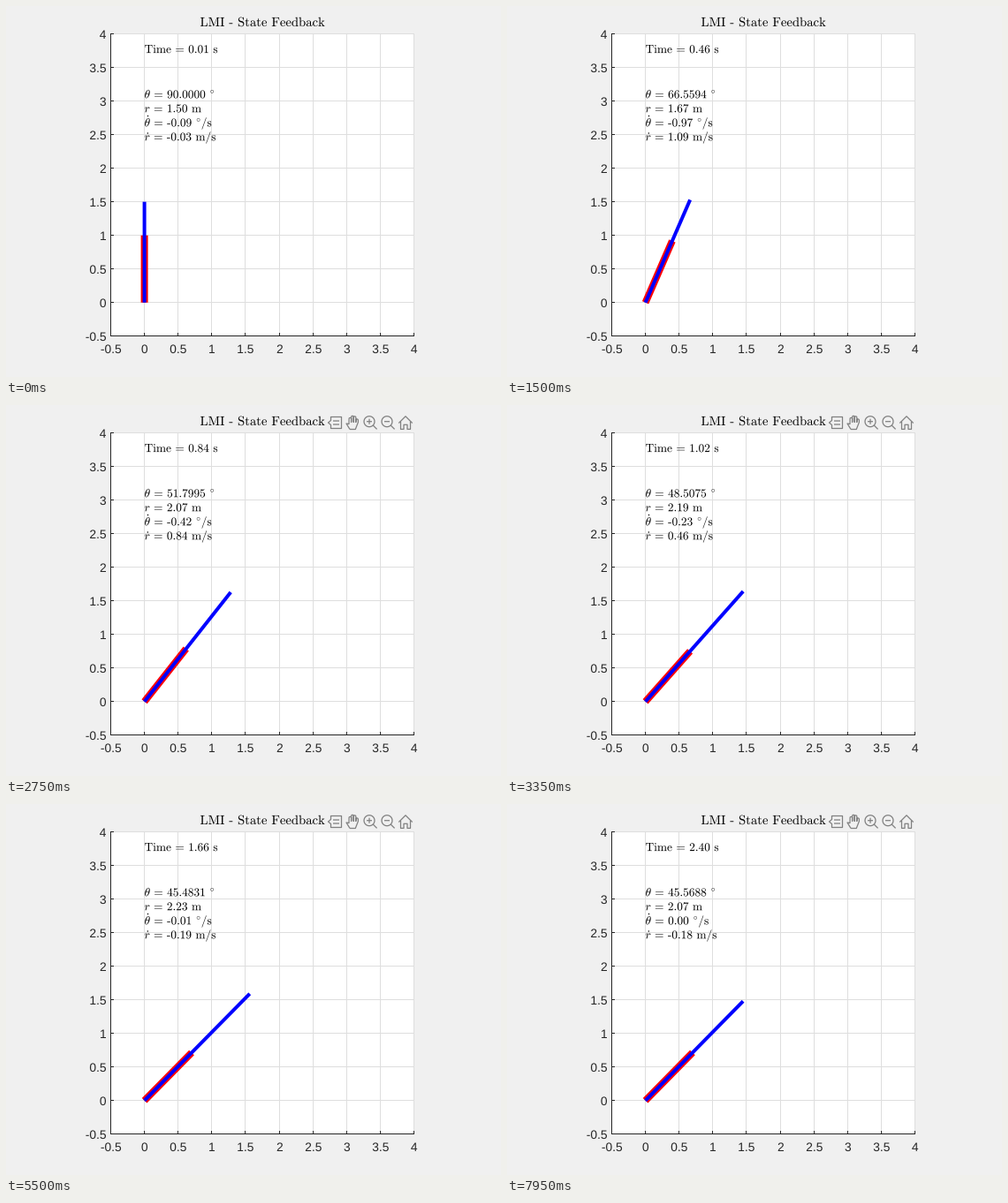
A matplotlib script for the animation above (8000 ms loop, 560x420 px).

```python
import numpy as np
import matplotlib.pyplot as plt
from matplotlib.animation import FuncAnimation
from matplotlib.patches import PathPatch
from matplotlib.textpath import TextPath
from matplotlib.transforms import Affine2D

plt.rcParams["mathtext.fontset"] = "cm"
plt.rcParams["font.family"] = "Liberation Sans"

W, H = 560, 420
N, DT = 160, 0.015
INK = (0.15, 0.15, 0.15)
GRID = (0.8725, 0.8725, 0.8725)
LEFT, TOP = 118.5, 31.5
DX, DY = 38.1, 38.03           # pixels per half unit
X0, Y0 = LEFT + DX, TOP + 8 * DY
GAP = r"\hspace{0.38}"         # one text space

# Angle: a damped swing towards its rest value
t = DT * np.arange(N)
DAMP, FREQ, LAG = 3.125, 1.75, 1.0445
REST = np.radians(45.62)
swing = np.exp(-DAMP * t) * np.cos(FREQ * t - LAG) / np.cos(LAG)
theta = REST + (np.pi / 2 - REST) * swing

# Reach: smooth curve through (time, length, speed)
KEYS = np.array([(0, 1.5, -0.03), (0.24, 1.5, 0.38), (0.66, 1.91, 1.1),
                 (1.005, 2.19, 0.46), (1.275, 2.26, 0.06),
                 (1.65, 2.23, -0.19), (2.39, 2.07, -0.18)])


def hermite(t):
    k = np.clip(np.searchsorted(KEYS[:, 0], t, "right") - 1, 0, len(KEYS) - 2)
    t0, p0, v0 = KEYS[k].T
    t1, p1, v1 = KEYS[k + 1].T
    h = t1 - t0
    u = (t - t0) / h
    ease = u * u * (3 - 2 * u)
    return (p0 + (p1 - p0) * ease + h * u * (1 - u) ** 2 * v0
            - h * u * u * (1 - u) * v1)


reach = hermite(t)
spin, slide = (np.gradient(x, DT, edge_order=2) for x in (theta, reach))

fig = plt.figure(figsize=(W / 100, H / 100), dpi=100, facecolor="#f0f0f0")
ax = fig.add_axes([0, 0, 1, 1])
ax.set_xlim(0, W)
ax.set_ylim(H, 0)
ax.axis("off")


def line(xs, ys, color, width=1.0, z=2, **kw):
    return ax.plot(xs, ys, color=color, lw=width * 0.72, zorder=z, snap=False,
                   solid_capstyle="butt", **kw)[0]


def label(x, y, s, size, color="black", align=0.0):
    """Text as outlines; align 0, 0.5, 1 is left, centre, right."""
    path = TextPath((0, 0), s, size=size)
    if align:
        x -= align * path.get_extents().x1
    place = Affine2D().scale(1, -1).translate(x, y)
    return ax.add_artist(PathPatch(path, fc=color, lw=0, zorder=6,
                                   transform=place + ax.transData))


def rm(s):
    return GAP.join(r"\text{%s}" % w for w in s.split())


def draw_axes():
    steps = np.arange(10)
    xs = np.floor(LEFT + steps * DX) + 0.5
    ys = np.floor(TOP + steps * DY) + 0.5
    l, r, top, b = xs[0], xs[-1], ys[0], ys[-1]
    ax.fill([l, r, r, l], [top, top, b, b], color="white", lw=0, zorder=0)
    for k, (x, y) in enumerate(zip(xs, ys)):
        line([x, x], [top - 0.5, b], GRID, z=1)
        line([l, r + 0.5], [y, y], GRID, z=1)
        line([x, x], [b - 3.5, b], INK)
        line([l, l + 3.5], [y, y], INK)
        label(x, 393, f"{k / 2 - 0.5:g}", 13.8, INK, 0.5)
        label(113, y + 5.5, f"{4 - k / 2:g}", 13.8, INK, 1)
    line([l, l], [top - 0.5, b + 0.5], INK)
    line([l - 0.5, r + 0.5], [b, b], INK)


def draw_tools():
    """Five outline icons, 20 px apart, each drawn around its centre."""
    parts = []

    def stroke(cx, *pts):
        xs, ys = np.transpose(pts)
        parts.append(line(cx + xs, 20 + ys, "#808080", 1.25, 5, alpha=0))

    def arc(x, y, r, start, end):
        a = np.linspace(start, end, 33)
        return list(zip(x + r * np.cos(a), y + r * np.sin(a)))

    # data tip
    stroke(372, (-4.5, -6.5), (7.5, -6.5), (7.5, 6.5), (-4.5, 6.5),
           (-4.5, 2.5), (-7.5, 0), (-4.5, -2.5), (-4.5, -7))
    for y in (-2, 2):
        stroke(372, (-2, y), (5, y))
    # hand: thumb, then four fingers of rising and falling height
    hand = [(-3, 7.5), (-7, 1), (-4, 1.5)]
    for k in range(4):
        x, tip = 2.6 * k - 2.7, 1.3 * (k - 1.3) ** 2 - 6.5
        hand += arc(x, tip, 1.3, np.pi, 2 * np.pi) + [(x + 1.3, -0.5)]
    stroke(392, *hand, (5, 3), (3.3, 7.5), (-3, 7.5))
    # magnifiers
    for cx in (412, 432):
        stroke(cx, *arc(-1, -1.3, 6, 0, 2 * np.pi))
        stroke(cx, (3.2, 3), (7.6, 7.4))
        stroke(cx, (-4, -1.3), (2, -1.3))
    stroke(412, (-1, -4.3), (-1, 1.7))
    # home
    stroke(452, (-7.7, 0.5), (0, -7.2), (7.7, 0.5))
    wall = [(-5.5, -1.2), (-5.5, 7.4), (-2, 7.4), (-2, 2.3)]
    stroke(452, *wall, *[(-x, y) for x, y in reversed(wall)])
    return parts


draw_axes()
tools = draw_tools()
label(290, 23, "$" + rm("LMI - State Feedback") + "$", 14.67, align=0.5)
sleeve = line([], [], "#ff0000", 8, 3)
rod = line([], [], "#0000ff", 4, 4)
clock = label(156.6, 53.2, "0", 13.33)
readouts = [label(156.6, 104.3 + 16 * k, "0", 13.33) for k in range(4)]


def write(patch, s):
    patch.set_path(TextPath((0, 0), "$" + s + "$", size=13.33))


def pose(bar, length, angle):
    bar.set_data([X0, X0 + 2 * DX * length * np.cos(angle)],
                 [Y0, Y0 - 2 * DY * length * np.sin(angle)])


def update(i):
    pose(sleeve, 1, theta[i])
    pose(rod, reach[i], theta[i])
    write(clock, rm(f"Time = {0.01 + t[i] + 1e-6:.2f} s"))
    degree = GAP + r"^{\circ}"
    rows = [
        (r"\theta", np.degrees(theta[i]), 4, degree),
        ("r", reach[i], 2, GAP + rm("m")),
        (r"\dot{\theta}", spin[i], 2, degree + rm("/s")),
        (r"\dot{r}", slide[i], 2, GAP + rm("m/s")),
    ]
    for patch, (name, value, places, unit) in zip(readouts, rows):
        number = f"{round(value, places) + 0.0:.{places}f}"
        write(patch, name + GAP + rm("= " + number) + unit)
    fade = min(max((i - 32) / 18, 0), 1)
    for part in tools:
        part.set_alpha(fade)
    return [sleeve, rod, clock, *readouts, *tools]


anim = FuncAnimation(fig, update, frames=N, interval=50, repeat=True,
                     repeat_delay=0, blit=False)
plt.show()
```
